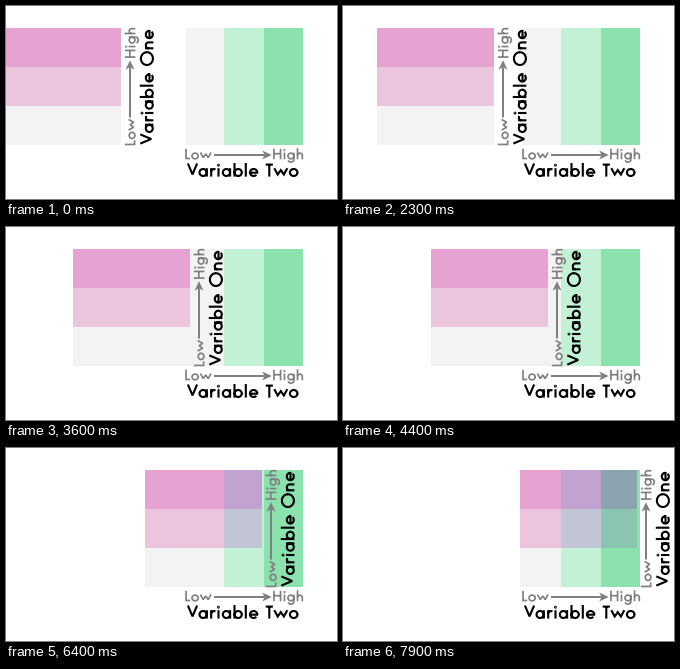
Write a matplotlib script that moves like this. It is 331 px wide and 193 px high and loops after 8000 ms.

```python
import numpy as np
import matplotlib.pyplot as plt
from matplotlib.animation import FuncAnimation
from matplotlib.patches import PathPatch, Polygon
from matplotlib.path import Path
from matplotlib.transforms import Affine2D

W, H, DPI = 331, 193, 100
FRAMES, HOLD, INTERVAL = 80, 9, 100
TRAVEL = 179                      # total slide in pixels
TOP, SIDE = 22, 117
STROKE, TRACK, SMALL = 2.1, 1.0, 0.81
GREY, BLACK = "#808080", "#000000"
PINKS = ["#e6a2d0", "#eac5dd", "#f3f3f3"]
GREENS = ["#f3f3f3", "#c2f1d5", "#8be2af"]


def rgb(code):
    return [int(code[i:i + 2], 16) for i in (1, 3, 5)]


# --- geometric sans lettering: each glyph is (advance, strokes) ---

def arc(cx, cy, rx, ry, start=0, end=365):
    t = np.radians(np.linspace(start, end, 40))
    return np.column_stack([cx + rx * np.cos(t), cy + ry * np.sin(t)])


def stem(x, top, bottom=0):
    return [(x, bottom), (x, top)]


def arch(x):
    return np.vstack([arc(x + 2.95, 4.9, 2.95, 2.7, 180, 0), [(x + 5.9, 0)]])


BOWL = arc(4.9, 4.1, 3.6, 3.5)
HOOK = np.vstack([[(8.6, 8.2)], arc(5, -0.6, 3.6, 2.9, 0, -165)])

GLYPHS = {
    " ": (5, []),
    "V": (10.2, [[(0.9, 13.1), (5.5, 2.2), (10.1, 13.1)]]),
    "T": (7.2, [[(0.3, 12.0), (7.5, 12.0)], stem(3.9, 12.0)]),
    "O": (15.0, [arc(7.5, 6.5, 6.4, 6.0)]),
    "L": (7.2, [[(1.9, 13), (1.9, 1.0), (7.0, 1.0)]]),
    "H": (12.0, [stem(1.9, 13), stem(10.1, 13), [(1.9, 6.9), (10.1, 6.9)]]),
    "a": (10.2, [BOWL, stem(8.6, 8.4)]),
    "b": (10.2, [arc(5.5, 4.1, 3.6, 3.5), stem(1.8, 13.6)]),
    "e": (9.6, [arc(4.8, 4.1, 3.7, 3.5, -4, 318), [(1.1, 3.9), (9.3, 3.9)]]),
    "g": (10.3, [BOWL, HOOK]),
    "h": (9.5, [stem(1.8, 13.6), arch(1.8)]),
    "i": (3.9, [stem(1.9, 8.4), arc(1.9, 11.4, 0.4, 0.4)]),
    "l": (3.9, [stem(1.9, 13.6)]),
    "n": (9.8, [stem(1.8, 8.4), arch(1.8)]),
    "o": (9.8, [arc(4.9, 4.1, 3.8, 3.5)]),
    "r": (6.2, [stem(1.8, 8.4), arc(4.5, 5.0, 2.7, 2.5, 180, 55)]),
    "w": (14.2, [[(0.7, 8.4), (4.1, 2.1), (7.2, 6.5), (10.3, 2.1), (13.7, 8.4)]]),
}

fig = plt.figure(figsize=(W / 100, H / 100), dpi=DPI, facecolor="white")
ax = fig.add_axes([0, 0, 1, 1])
ax.axis("off")

# --- colour blocks, blended by taking the darker channel ---

base = np.full((H, W, 3), 255, np.uint8)
for left, right, code in zip((180, 218, 258), (218, 258, 297), GREENS):
    base[TOP:TOP + SIDE, left:right] = rgb(code)
bands = np.repeat(np.array([rgb(c) for c in PINKS], np.uint8), SIDE // 3, axis=0)


def blend(shift):
    img = base.copy()
    left = shift - 2
    area = img[TOP:TOP + SIDE, max(left, 0):left + SIDE]
    np.minimum(area, bands[:, None, :], out=area)
    return img


picture = ax.imshow(blend(0), extent=(0, W, H, 0), interpolation="nearest",
                    aspect="auto")
ax.set_xlim(0, W)
ax.set_ylim(H, 0)

slide = Affine2D()
moving = slide + ax.transData


def add_strokes(lines, width, color, trans):
    path = Path.make_compound_path(*[Path(line) for line in lines])
    ax.add_patch(PathPatch(path, fill=False, edgecolor=color, transform=trans,
                           linewidth=width * 72 / DPI, capstyle="butt",
                           joinstyle="miter", snap=False))


def write(text, x, y, color, scale=1.0, upward=False):
    lines, pen = [], 0
    for ch in text:
        advance, strokes = GLYPHS[ch]
        for s in strokes:
            p = (np.array(s, float) + (pen, 0)) * scale
            if upward:
                lines.append(np.column_stack([x - p[:, 1], y - p[:, 0]]))
            else:
                lines.append(np.column_stack([x + p[:, 0], y - p[:, 1]]))
        pen += advance + TRACK
    add_strokes(lines, STROKE * scale, color, moving if upward else ax.transData)


def arrow(tail, tip, trans):
    tail, tip = np.array(tail, float), np.array(tip, float)
    along = (tip - tail) / np.hypot(*(tip - tail))
    across = along[::-1] * 4.5
    back, notch = tip - along * 9.5, tip - along * 7
    add_strokes([[tail, notch]], 2, GREY, trans)
    ax.add_patch(Polygon([tip, back + across, notch, back - across],
                         facecolor=GREY, edgecolor="none", transform=trans,
                         snap=False))


write("Low", 178.5, 153.3, GREY, SMALL)
write("High", 266.4, 153.3, GREY, SMALL)
arrow((208, 149), (265.7, 149), ax.transData)
write("Variable Two", 181, 170.6, BLACK)

write("Low", 129.4, 140, GREY, SMALL, upward=True)
write("High", 129.4, 52.6, GREY, SMALL, upward=True)
arrow((124, 111.5), (124, 54.2), moving)
write("Variable One", 147.4, 138.5, BLACK, upward=True)


def update(n):
    step = max(0, n - HOLD)
    shift = int(step * TRAVEL / (FRAMES - 1 - HOLD) + 0.5)
    picture.set_data(blend(shift))
    slide.clear().translate(shift, 0)
    return []


anim = FuncAnimation(fig, update, frames=FRAMES, interval=INTERVAL,
                     init_func=lambda: update(0), repeat=True, repeat_delay=0)
plt.show()
```
